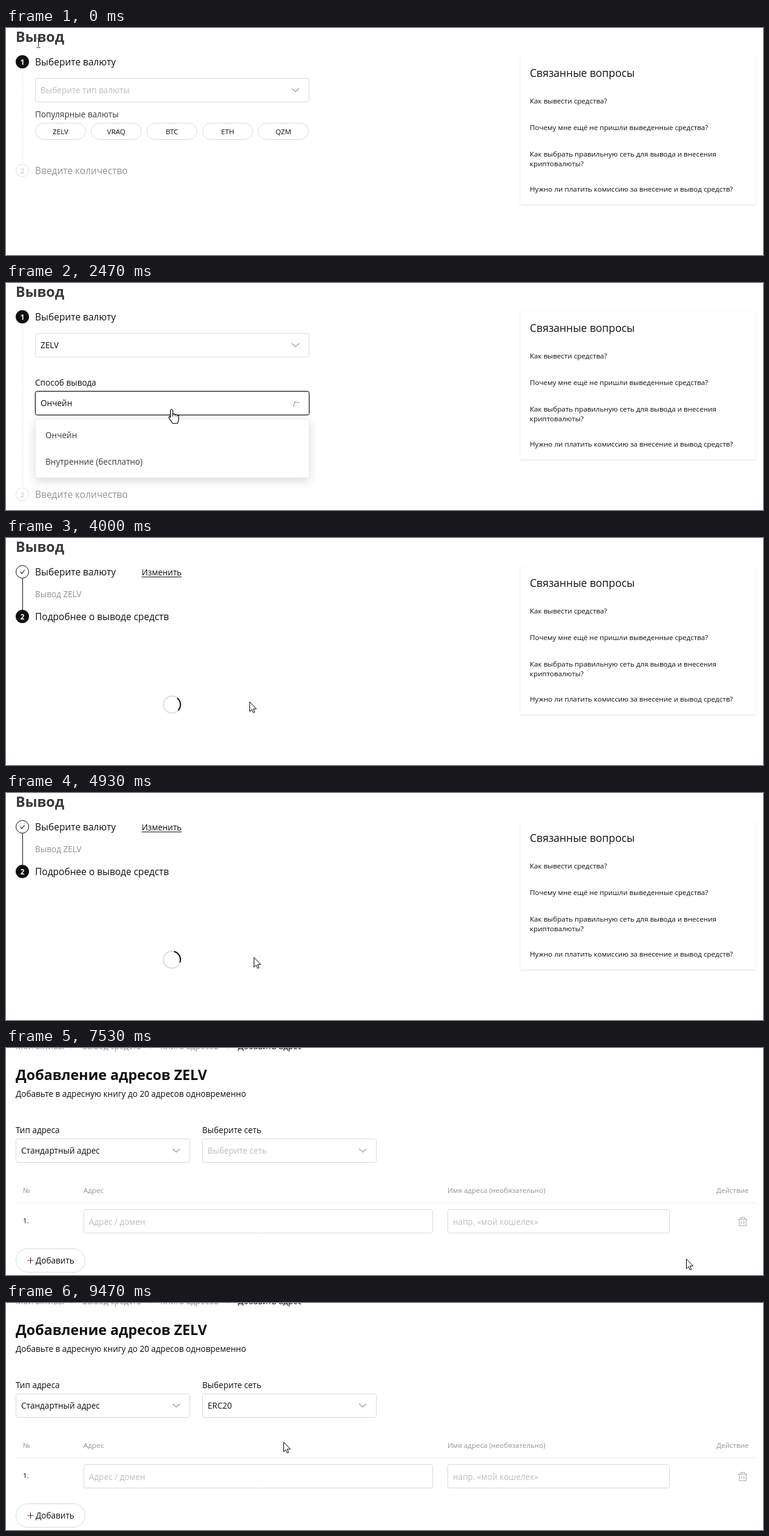
These frames come from a looping animation (1250x376 px, 9.99 s). An HTML page with a canvas:

```html
<!DOCTYPE html>
<html lang="ru">
<head>
<meta charset="utf-8">
<title>Вывод</title>
<style>
html, body { margin: 0; width: 100%; height: 100%; overflow: hidden; background: #fff; }
canvas { display: block; }
</style>
</head>
<body>
<canvas id="stage" width="1250" height="376"></canvas>
<script>
const c = document.getElementById('stage').getContext('2d');
const LOOP = 9990, FPS = 15;
const FONT = '"Open Sans", "Noto Sans", sans-serif', SCALE = 0.97;
const INK = '#0f0f0f', DARK = '#3a3a3a', GREY = '#929292', PALE = '#bdbdbd', EDGE = '#d9d9d9';
const COIN = 'ZELV';

const clamp = v => Math.max(0, Math.min(1, v));
const smooth = v => v * v * (3 - 2 * v);
const ramp = (t, a, d = 200) => smooth(clamp((t - a) / d));
const shown = (t, a, b, d) => ramp(t, a, d) * (1 - ramp(t, b, d));

function text(s, x, y, size = 14, weight = 400, color = INK, align = 'left') {
  c.font = `${weight} ${size * SCALE}px ${FONT}`;
  c.textAlign = align;
  c.fillStyle = color;
  c.fillText(s, x, y);
  return c.measureText(s).width;
}

function link(s, x, y, size) {
  const w = text(s, x, y, size, 500);
  c.fillRect(x, y + 2, Math.round(w), 1);
}

function box(x, y, w, h, r, stroke, fill) {
  c.beginPath();
  c.roundRect(x + .5, y + .5, w - 1, h - 1, r);
  if (fill) { c.fillStyle = fill; c.fill(); }
  if (stroke) { c.strokeStyle = stroke; c.lineWidth = 1; c.stroke(); }
}

function disc(x, y, r, fill, stroke) {
  c.beginPath();
  c.arc(x, y, r, 0, 7);
  if (fill) { c.fillStyle = fill; c.fill(); }
  if (stroke) { c.strokeStyle = stroke; c.lineWidth = 1; c.stroke(); }
}

function path(d, x, y, stroke, width = 1, fill) {
  const p = new Path2D(d);
  c.save();
  c.translate(x, y);
  if (fill) { c.fillStyle = fill; c.fill(p); }
  if (stroke) { c.strokeStyle = stroke; c.lineWidth = width; c.stroke(p); }
  c.restore();
}

function chevron(x, y, turn = 0) {
  c.save();
  c.translate(x, y);
  c.rotate(turn * Math.PI);
  path('M-6-3L0 2.5L6-3', 0, 0, '#999', 1.2);
  c.restore();
}

function select(x, y, w, label, { empty, focus = 0, turn = focus } = {}) {
  if (focus) {
    c.save();
    c.globalAlpha = focus;
    box(x - 1, y - 1, w + 2, 42, 4, '#c8c8c8');
    c.restore();
  }
  box(x, y, w, 40, 3, focus > .3 ? INK : EDGE, '#fff');
  text(label, x + 9, y + 25, 14, 400, empty ? PALE : INK);
  chevron(x + w - 23, y + 20, turn);
}

// Panel that unfolds from its top edge.
function panel(x, y, w, h, p, draw) {
  if (p <= 0) return;
  c.save();
  c.globalAlpha = p;
  c.translate(0, y);
  c.scale(1, .8 + .2 * p);
  c.translate(0, -y);
  c.shadowColor = 'rgba(0,0,0,.16)';
  c.shadowBlur = 16;
  c.shadowOffsetY = 5;
  box(x, y, w, h, 3, null, '#fff');
  c.shadowColor = 'transparent';
  box(x, y, w, h, 3, '#ececec');
  draw();
  c.restore();
}

function lens(x, y, color) {
  path('M4.5 0a4.5 4.5 0 1 1-9 0a4.5 4.5 0 1 1 9 0M3.2 3.2L6 6', x, y, color, 1.2);
}

function step(n, y, active) {
  disc(27, y, active ? 11 : 10.5, active ? INK : '#fff', active ? null : '#e0e0e0');
  text(n, 27, y + 4.5, 12, active ? 700 : 400, active ? '#fff' : PALE, 'center');
}

function help() {
  c.save();
  c.shadowColor = 'rgba(0,0,0,.12)';
  c.shadowBlur = 3;
  c.shadowOffsetY = 1;
  box(849, 46, 390, 247, 1, null, '#fff');
  c.restore();
  text('Связанные вопросы', 865, 81, 18, 500);
  [['Как вывести средства?', 125],
   ['Почему мне ещё не пришли выведенные средства?', 169],
   ['Как выбрать правильную сеть для вывода и внесения', 213],
   ['криптовалюты?', 229],
   ['Нужно ли платить комиссию за внесение и вывод средств?', 271]
  ].forEach(([s, y]) => text(s, 865, y, 12));
}

function heading() {
  text('Вывод', 16, 23, 24, 700, DARK);
  text('Выберите валюту', 48, 62, 16, 500);
  help();
}

function coinList() {
  box(65, 142, 419, 32, 4, null, '#f4f4f4');
  lens(81, 157, '#999');
  text('Искать', 94, 163, 12, 400, PALE);
  c.fillStyle = '#f7f9f8';
  c.fillRect(49, 182, 447, 48);
  c.fillStyle = '#b8b8b8';
  c.fillRect(496, 182, 4, 17);
  [[COIN, 'Zelvor', '#3fa17f'], ['VRAQ', 'Vra Dime', '#2f78c8'],
   ['BTC', 'Bitcoin', '#f09242'], ['ETH', 'Ethereum', '#6284ee']
  ].forEach(([code, name, color], i) => {
    const y = 206 + i * 48;
    disc(77, y, 11, color);
    const w = text(code, 97, y + 5, 14, 400, DARK);
    text(name, 97 + w + 8, y + 4, 12, 400, '#888');
  });
}

function choose(t) {
  heading();
  const picked = t >= 1460, method = t >= 1660, y2 = method ? 350 : 236;
  c.strokeStyle = '#dedede';
  c.lineWidth = 1;
  c.setLineDash([2, 2]);
  c.beginPath();
  c.moveTo(27.5, 69);
  c.lineTo(27.5, y2 - 13);
  c.stroke();
  c.setLineDash([]);
  step('1', 56, true);
  step('2', y2, false);
  text('Введите количество', 48, y2 + 6, 16, 400, GREY);

  const focus = shown(t, 640, 1530);
  select(48, 83, 453, picked ? COIN : 'Выберите тип валюты', { empty: !picked, focus });
  if (!method) {
    text('Популярные валюты', 48, 148, 14, 400, DARK);
    [COIN, 'VRAQ', 'BTC', 'ETH', 'QZM'].forEach((s, i) => {
      box(48 + i * 92, 157, 84, 28, 14, EDGE);
      text(s, 90 + i * 92, 176, 12, 500, INK, 'center');
    });
  } else {
    text('Способ вывода', 48, 170, 14, 500);
    const open = shown(t, 2220, 2830);
    select(48, 179, 453, 'Ончейн', { focus: open, turn: shown(t, 2220, 2830, 340) });
    panel(48, 225, 453, 98, open, () => {
      text('Ончейн', 65, 257, 14, 400, DARK);
      text('Внутренние (бесплатно)', 65, 301, 14, 400, DARK);
    });
  }
  panel(48, 129, 453, 320, shown(t, 640, 1430), coinList);
}

function details(t) {
  heading();
  c.fillStyle = INK;
  c.fillRect(27, 67, 1, 52);
  disc(27, 56, 10.5, '#fff', INK);
  path('M-3.5 0L-1 2.8L3.8-3', 27, 56, INK, 1.1);
  link('Изменить', 224, 62, 14);
  text('Вывод ' + COIN, 48, 98, 14, 400, GREY);
  step('2', 130, true);
  text('Подробнее о выводе средств', 48, 136, 16, 500);

  const a = (t - 4000) / 1000 * 2 * Math.PI;
  c.lineWidth = 2;
  c.strokeStyle = '#dcdcdc';
  c.beginPath();
  c.arc(274, 276, 14, 0, 7);
  c.stroke();
  c.strokeStyle = INK;
  c.beginPath();
  c.arc(274, 276, 14, a - .9, a + .75);
  c.stroke();
}

function crumbs(last) {
  const all = ['Мои активы', 'Вывод средств', 'Книга адресов', 'Добавить адрес'];
  [16, 126, 255, 383].slice(0, last + 1).forEach((x, i) => {
    text(all[i], x, 2, 14, 400, i === last ? INK : GREY);
    if (i) path('M-2-5L2-1.5L-2 2', x - 16, -1, PALE);
  });
}

function toggle(y, color) {
  box(1171, y, 44, 24, 12, null, color);
  disc(1183, y + 12, 10, '#fff');
}

function book() {
  crumbs(2);
  text('Адресная книга', 16, 59, 24, 700);
  box(16, 95, 1224, 155, 2, '#ebebeb');
  path('M-4-7H-7V8H7V-7H4M-4-8H4V-5H-4ZM-4-1H4M-4 3H2', 52.5, 132, INK, 1.6);
  text('Список разрешенных адресов отключен', 77, 133, 14, 700, DARK);
  text('Когда включен список разрешенных адресов, вы можете выводить средства только на адреса, указанные в адресной книге', 77, 157, 12, 400, GREY);
  link('Подробнее', 789, 157, 12);
  path('M-4-2V-5a4 4 0 0 1 8 0V-2', 52.5, 197, PALE, 2);
  box(45, 195, 15, 11, 1, null, PALE);
  disc(52.5, 200, 1.3, '#fff');
  text('Блокировка нового адреса для вывода средств', 77, 198, 14, 700, PALE);
  text('Предотвратить вывод средств на 24 часа на новые адреса из списка разрешенных', 77, 221, 12, 400, '#b5b5b5');
  toggle(120, PALE);
  toggle(185, '#ebebeb');

  text('Ончейн', 16, 306, 14, 500);
  text('Внутренние', 91, 306, 14, 400, GREY);
  c.fillStyle = '#e8e8e8';
  c.fillRect(16, 321, 1224, 1);
  c.fillStyle = INK;
  c.fillRect(16, 319, 51, 2);
  [COIN, 'Все виды адресов', 'Все статусы'].forEach((s, i) => {
    const x = 16 + i * 208;
    box(x, 346, 184, 32, 3, EDGE, i ? '#fff' : '#f8f8f8');
    text(s, x + 9, 367, 12, 400, i ? INK : '#c8c8c8');
    chevron(x + 162, 362);
  });
  box(640, 346, 216, 32, 3, EDGE);
  lens(656, 361, DARK);
  text('Поиск по адресу или имени', 670, 367, 12, 400, PALE);
  box(931, 346, 133, 32, 16, INK, INK);
  text('Добавить адрес', 997.5, 367, 14, 500, '#fff', 'center');
  box(1080, 346, 160, 32, 16, EDGE);
  text('Добавить группами', 1160, 367, 14, 500, INK, 'center');
}

function addPage(t) {
  crumbs(3);
  text('Добавление адресов ' + COIN, 16, 53, 24, 700);
  text('Добавьте в адресную книгу до 20 адресов одновременно', 16, 81);
  text('Тип адреса', 16, 141, 14, 500);
  text('Выберите сеть', 324, 141, 14, 500);
  const open = shown(t, 8210, 9210), picked = t >= 9260;
  select(16, 150, 288, 'Стандартный адрес');
  select(324, 150, 288, picked ? 'ERC20' : 'Выберите сеть', { empty: !picked, focus: open });
  [['№', 28], ['Адрес', 128], ['Имя адреса (необязательно)', 729], ['Действие', 1173]]
    .forEach(([s, x]) => text(s, x, 240, 12, 400, GREY));
  c.fillStyle = '#eee';
  c.fillRect(16, 256, 1224, 1);
  text('1.', 28, 290, 12);
  box(128, 267, 577, 40, 3, EDGE);
  text('Адрес / домен', 137, 293, 14, 400, PALE);
  box(729, 267, 367, 40, 3, EDGE);
  text('напр. «мой кошелек»', 738, 293, 14, 400, PALE);
  path('M-7.5-4H7.5M-3-4V-7H3V-4M-5.5-4V7H5.5V-4M-2-.5V4M2-.5V4', 1216.5, 287.5, '#aaa', 1.1);
  box(16, 332, 115, 40, 20, EDGE);
  path('M-5 0H5M0-5V5', 40.5, 352, '#5b1a5c', 1.2);
  text('Добавить', 49, 357, 14, 500);
  panel(324, 196, 288, 54, open, () => text('ERC20', 341, 228, 14, 400, DARK));
}

// Pointer keys: time, x, y of the hot spot.
const MOVES = [
  [0, 53, 26], [530, 254, 94], [870, 254, 94], [1270, 258, 186], [1660, 258, 186],
  [2130, 273, 209], [2500, 273, 209], [2730, 262, 245], [3060, 262, 245], [3600, 402, 271],
  [4860, 402, 271], [5800, 806, 317], [5866, 951, 330], [5933, 1060, 338], [6000, 1130, 345],
  [6066, 1175, 350], [6330, 1206, 354], [6460, 1206, 354], [6730, 1010, 357], [6930, 1010, 357],
  [7400, 1131, 355], [7466, 1131, 355], [7533, 1123, 349], [8130, 361, 172], [8460, 361, 172],
  [8660, 487, 218], [8866, 458, 232], [9000, 458, 232], [9130, 458, 230], [LOOP, 458, 230]
];
const HAND = 'M-2 2a2 2 0 0 1 4 0v6q2-1.6 3.7.4q2.4-1 3.3.9q2.7-.6 2.7 2.2v4.5q0 3-2.2 7h-8q-2-4-5.5-8.2q-1.4-2 .2-3q1.6-.7 1.8 1.7z';
const ARROW = 'M.5.5V16.5L4 13L6.5 18.5L8.8 17.5L6.4 12H11.5Z';
const HAND_TIMES = [[400, 3000], [6000, 6930], [8060, 9400]];

function pointer(t) {
  const i = MOVES.findIndex(k => k[0] > t);
  const [t0, x0, y0] = MOVES[i - 1], [t1, x1, y1] = MOVES[i];
  const p = smooth((t - t0) / (t1 - t0));
  const x = Math.round(x0 + (x1 - x0) * p), y = Math.round(y0 + (y1 - y0) * p);
  if (t < 130) {
    path('M-3-8.5H-1L0-7.5L1-8.5H3M0-7.5V5.5M-3 6.5H-1L0 5.5L1 6.5H3', x + .5, y, '#222');
  } else if (HAND_TIMES.some(([a, b]) => t >= a && t < b)) {
    path(HAND, x + .5, y + .5, '#000', 1.2, '#fff');
    path('M2 8v3.5M5.7 8.4v3M9 9.3v2.6', x + .5, y + .5, '#000');
  } else {
    path(ARROW, x, y, '#000', 1, '#fff');
  }
}

function draw(now) {
  const t = Math.floor((now % LOOP + 4) * FPS / 1000) * 1000 / FPS;
  c.fillStyle = '#fff';
  c.fillRect(0, 0, 1250, 376);
  if (t < 3790) choose(t);
  else if (t < 5330) details(t);
  else if (t < 6930) book();
  else addPage(t);
  pointer(t);
}

let start;
function tick(now) {
  start ??= now;
  draw(now - start);
  requestAnimationFrame(tick);
}
draw(0);
requestAnimationFrame(tick);
</script>
</body>
</html>
```
